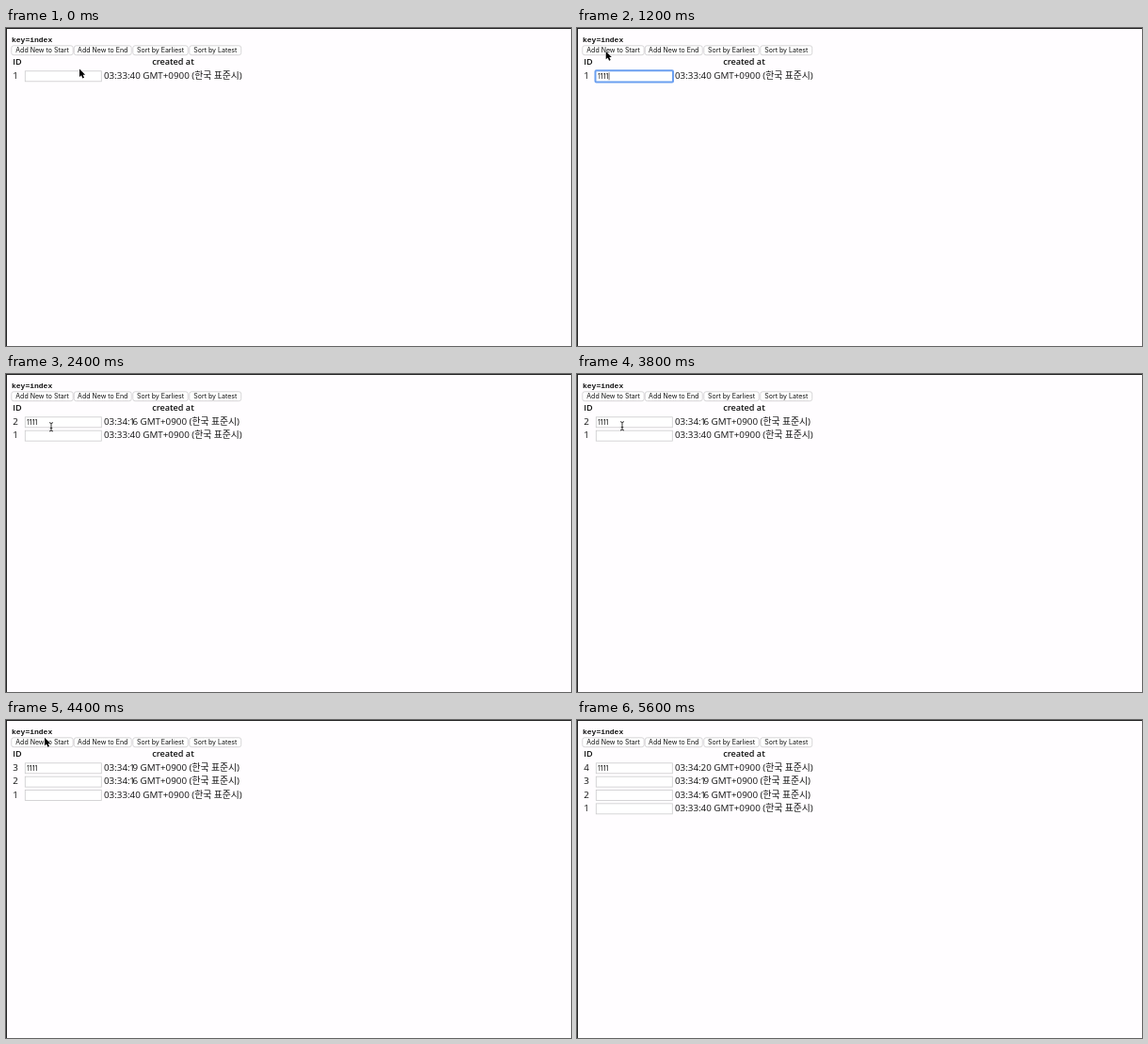
An HTML page that plays this animation: 600 px wide and 338 px high, repeating every 6.6 s.

```html
<!DOCTYPE html>
<html lang="ko">
<head>
<meta charset="utf-8">
<style>
html, body { margin: 0; height: 100%; overflow: hidden; background: #fffdff; }
svg { display: block; width: 600px; height: 338px; }
text { fill: #111; font: 9.8px "Open Sans", "Noto Sans CJK KR", "Noto Sans CJK", sans-serif; white-space: pre; }
.code { font: bold 8px "Liberation Mono", monospace; }
.ui { font: 7px Inter, sans-serif; }
.head { font-size: 9.1px; font-weight: 600; }
.mid { text-anchor: middle; }
.on { fill: #fff; }
</style>
</head>
<body>
<svg id="stage" viewBox="0 0 600 338"></svg>
<script>
const LOOP = 6600, STEP = 100;
const stage = document.getElementById('stage');

const buttons = [
  [5.5, 66, 'Add New to Start'],
  [72, 61.5, 'Add New to End'],
  [134.5, 59, 'Sort by Earliest'],
  [194.5, 55.5, 'Sort by Latest']
];
// [time of appearance, clock text]
const entries = [[0, '03:33:40'], [1600, '03:34:16'], [4400, '03:34:19'], [5500, '03:34:20']];
// pointer path: [time, x, y]
const path = [
  [0, 78, 43.5], [300, 77.5, 53], [900, 77.5, 53], [1200, 30.7, 24.7],
  [2000, 30.7, 24.7], [2200, 51.5, 63], [2300, 51.5, 63], [2400, 48, 56.3],
  [3700, 48, 56.3], [3800, 48, 55.3], [4200, 41, 18.7], [LOOP, 41, 18.7]
];
const within = (t, a, b) => t >= a && t < b;

function pointerAt(t) {
  const i = path.findIndex(k => k[0] > t);
  const [t0, x0, y0] = path[i - 1], [t1, x1, y1] = path[i];
  const p = (t - t0) / (t1 - t0), e = p * p * (3 - 2 * p);
  return [x0 + (x1 - x0) * e, y0 + (y1 - y0) * e];
}

const text = (x, y, s, cls = '') => `<text x="${x}" y="${y}" class="${cls}">${s}</text>`;
const rect = (x, y, w, h, attrs) => `<rect x="${x}" y="${y}" width="${w}" height="${h}" ${attrs}/>`;

function button([x, w, label], pressed) {
  const look = pressed ? 'fill="#4b93f7" stroke="#3a7fe0"' : 'fill="#fff" stroke="#c6c5c7"';
  return rect(x + .3, 18.8, w - .6, 9.9, `rx="2.3" stroke-width=".7" ${look}`) +
    text(x + w / 2, 26.2, label, 'ui mid' + (pressed ? ' on' : ''));
}

// the figure 1 is set narrow inside clock text
const clock = s => s.replace(/1(.)/, '<tspan dx="-.5">1</tspan><tspan dx="-2.3">$1</tspan>');

function row(i, id, time, value, focused) {
  const y = 14.35 * i;
  let out = text(7.3, 54 + y, id) + text(104, 54 + y, clock(time) + ' GMT+0900 (한국 표준시)');
  out += focused
    ? rect(19.5, 45.3 + y, 82.5, 12.2, 'rx="1" fill="#fff" stroke="#6b9ff0" stroke-width="2"')
    : rect(20.3, 45.8 + y, 81, 11, 'fill="#fff" stroke="#cbcacc" stroke-width=".8"');
  return out + text(22, 54 + y, value, 'ui');
}

function pointer(x, y) {
  const beam = y > 45;
  const shape = beam
    ? '<path d="M-2 -4.6Q0 -4.6 0 -3.2Q0 -4.6 2 -4.6M0 -3.2V3.2M-2 4.6Q0 4.6 0 3.2Q0 4.6 2 4.6M-1.2 1.2H1.2" fill="none" stroke="#222" stroke-width=".9"/>'
    : '<path d="M0 0V8.5L2 6.7L3.4 10L5 9.3L3.6 6.2H6.1Z" fill="#000" stroke="#fff" stroke-width=".7" paint-order="stroke"/>';
  return `<g transform="translate(${x} ${y})">${shape}</g>`;
}

function draw(t) {
  const focused = within(t, 300, 1600);
  const value = '1'.repeat(Math.max(0, Math.min(4, (t - 500) / STEP)));
  const pressed = within(t, 4200, 4400) || within(t, 5400, 5500);
  const shown = entries.filter(e => e[0] <= t);
  const n = shown.length;
  let out = rect(0, 0, 600, 1, 'fill="#222"') + rect(0, 0, 1, 338, 'fill="#222"');
  out += text(6, 15, 'key=index', 'code');
  out += buttons.map((b, i) => button(b, pressed && i === 0)).join('');
  out += text(7.3, 39.3, 'ID', 'head') + text(177.5, 39.3, 'created at', 'head mid');
  out += shown.reverse().map((e, i) => row(i, n - i, e[1], i ? '' : value, focused && !i)).join('');
  stage.innerHTML = out;

  if (focused) {
    const field = stage.querySelectorAll('.ui')[buttons.length];
    const end = 22.3 + (value ? field.getComputedTextLength() : 0);
    out += rect(end, 47.3, .7, 8, 'fill="#333"');
  }
  // the pointer hides while typing
  if (!within(t, 600, 1000) && t < 5600) out += pointer(...pointerAt(t));
  stage.innerHTML = out;
}

const start = performance.now();
let last = -1;
function tick() {
  const t = Math.floor(((performance.now() - start) % LOOP) / STEP) * STEP;
  if (t !== last) draw(last = t);
  requestAnimationFrame(tick);
}
tick();
</script>
</body>
</html>
```
